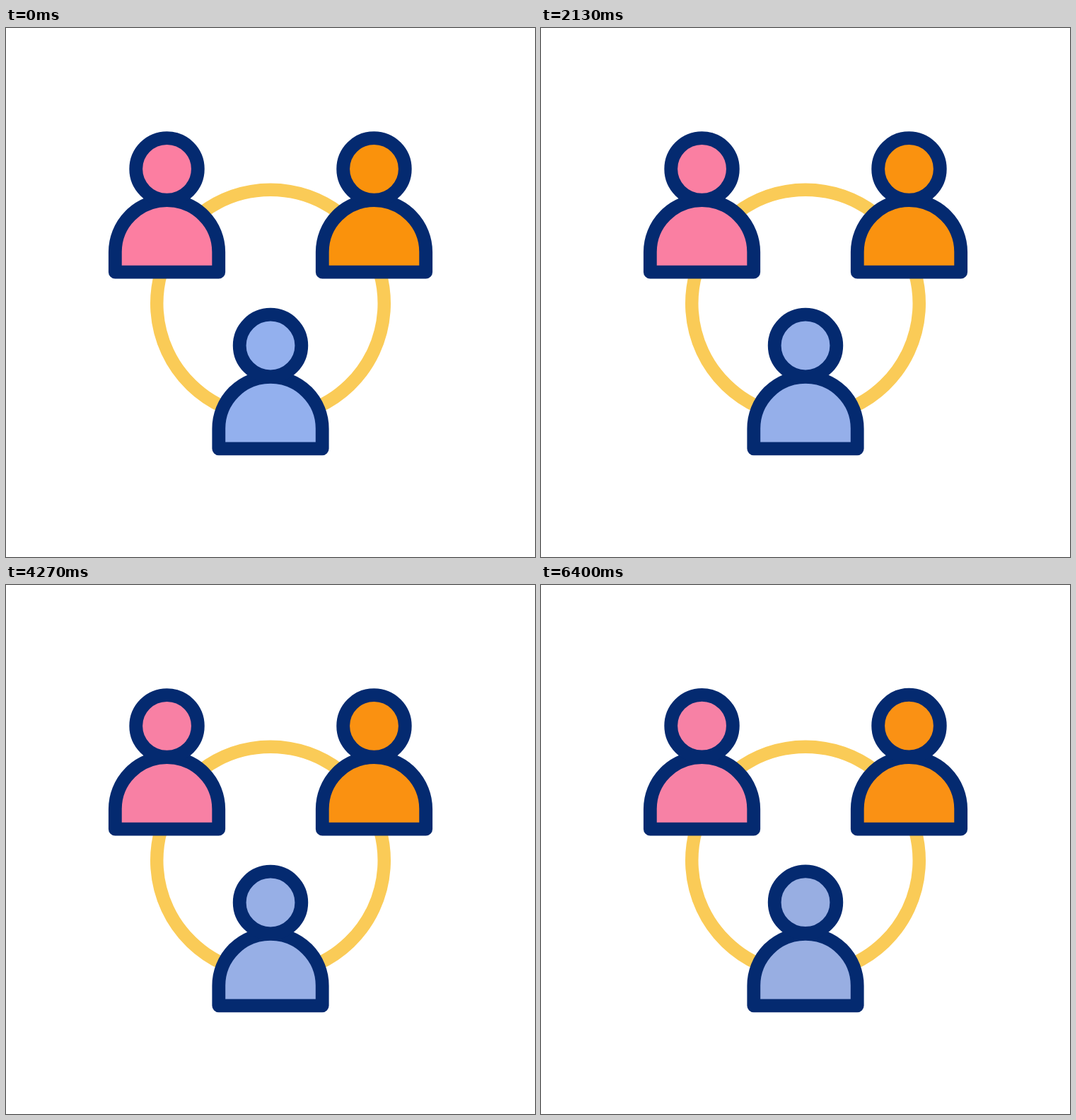
An HTML page for the animation above (6.47 s loop, 748 by 748 pixels).

```html
<!DOCTYPE html>
<html lang="en">
<head>
<meta charset="utf-8">
<title>People circle</title>
<style>
  html, body { margin: 0; width: 100%; height: 100%; overflow: hidden; background: #fff; }
  svg { display: block; width: 100vw; height: 100vh; }
  .arc { fill: none; stroke: #facb57; stroke-width: 18.5; stroke-linecap: round; }
  .person { stroke: #042a70; stroke-width: 18.8; stroke-linejoin: round; }
</style>
</head>
<body>
<svg viewBox="0 0 748 748">
  <g id="arcs"></g>
  <g id="people"></g>
</svg>
<script>
const LOOP = 6470, LAST = 6360, CYCLE = 6400 / 3;
const MOVE_START = 267, MOVE_END = 1400;
const SETTLE = 1367, GROW_END = 2077, BOB_END = 2100;
const RING = { x: 374, y: 389.5, r: 160.75 };
const ORBIT = { x: 374, y: 436.2, r: 167.8 };

// One entry per place: angle and sweep on the orbit, bulge of the way to the
// next place, its pacing, the ring arc that follows, and the head's bob.
const places = [
  { color: [252, 126, 161], angle: 209.2, sweep: 121.6, bulge: [-56, -3, -60],  skew: 0.18,  arc: [232.4, 307.6], bob: 8.5 },
  { color: [250, 146, 12],  angle: 330.8, sweep: 119.2, bulge: [68, 125, -173], skew: -0.16, arc: [344.3, 425.6], bob: 10.7 },
  { color: [147, 176, 238], angle: 90,    sweep: 119.2, bulge: [52, -124, 95],  skew: 0,     arc: [114.4, 195.7], bob: 10.4 }
];

const clamp = v => Math.min(1, Math.max(0, v));
const part = (t, a, b) => clamp((t - a) / (b - a));
const mix = (a, b, f) => a + (b - a) * f;
const smooth = v => v * v * (3 - 2 * v);
const polar = (c, r, deg) => {
  const a = deg * Math.PI / 180;
  return [c.x + r * Math.cos(a), c.y + r * Math.sin(a)];
};

// Ease with handles (0.58, 0) and (0.205, 1)
function ease(x) {
  if (x <= 0 || x >= 1) return clamp(x);
  let lo = 0, hi = 1;
  for (let i = 0; i < 24; i++) {
    const s = (lo + hi) / 2, q = 1 - s;
    if (3 * 0.58 * s * q * q + 3 * 0.205 * s * s * q + s * s * s < x) lo = s; else hi = s;
  }
  return smooth(lo);
}

function add(parent, tag, attrs) {
  const el = document.createElementNS('http://www.w3.org/2000/svg', tag);
  for (const k in attrs) el.setAttribute(k, attrs[k]);
  return parent.appendChild(el);
}

const arcsLayer = document.getElementById('arcs');
const peopleLayer = document.getElementById('people');
const arcs = places.map(() => add(arcsLayer, 'path', { class: 'arc' }));
const people = places.map(() => {
  const group = add(peopleLayer, 'g', { class: 'person' });
  add(group, 'path', { d: 'M-73.2 -9.2V-37.5a73.2 73.2 0 0 1 146.4 0V-9.2Z' });
  const head = add(group, 'circle', { cy: -155, r: 43.8 });
  return { group, head };
});

function position(place, p) {
  const q = p + place.skew * p * (1 - p) * (p - 0.5);
  const [a, b, c] = place.bulge;
  const r = ORBIT.r + q * (1 - q) * (a + b * q + c * q * q);
  return polar(ORBIT, r, place.angle + place.sweep * q);
}

function arcPath([from, to], start, end) {
  if (end - start < 0.005) return '';
  const a = polar(RING, RING.r, mix(from, to, start));
  const b = polar(RING, RING.r, mix(from, to, end));
  return `M${a}A${RING.r} ${RING.r} 0 0 1 ${b}`;
}

// 25 poses a second shown on a 30 per second clock: every sixth tick repeats
function poseTime(ms) {
  const tick = Math.floor((ms + 4) * 0.03);
  return Math.min(LAST, Math.floor(tick / 6) * 200 + Math.max(0, tick % 6 - 1) * 40);
}

function draw(ms) {
  const t = poseTime(ms) % CYCLE;
  const moved = ease(part(t, MOVE_START, MOVE_END));
  const grown = smooth(part(t, SETTLE, GROW_END));
  const tint = part(t, SETTLE, CYCLE);
  const bob = Math.sin(Math.PI * part(t, SETTLE, BOB_END));

  places.forEach((place, i) => {
    const next = places[(i + 1) % 3];
    const { group, head } = people[i];
    const color = place.color.map((c, k) => Math.round(mix(c, next.color[k], tint)));
    group.setAttribute('transform', `translate(${position(place, moved)})`);
    group.setAttribute('fill', `rgb(${color})`);
    head.setAttribute('cy', -155 - next.bob * bob);
    arcs[i].setAttribute('d', t < SETTLE ? arcPath(place.arc, moved, 1) : arcPath(next.arc, 0, grown));
  });
}

const began = performance.now();
function tick() {
  draw((performance.now() - began) % LOOP);
  requestAnimationFrame(tick);
}
tick();
</script>
</body>
</html>
```
